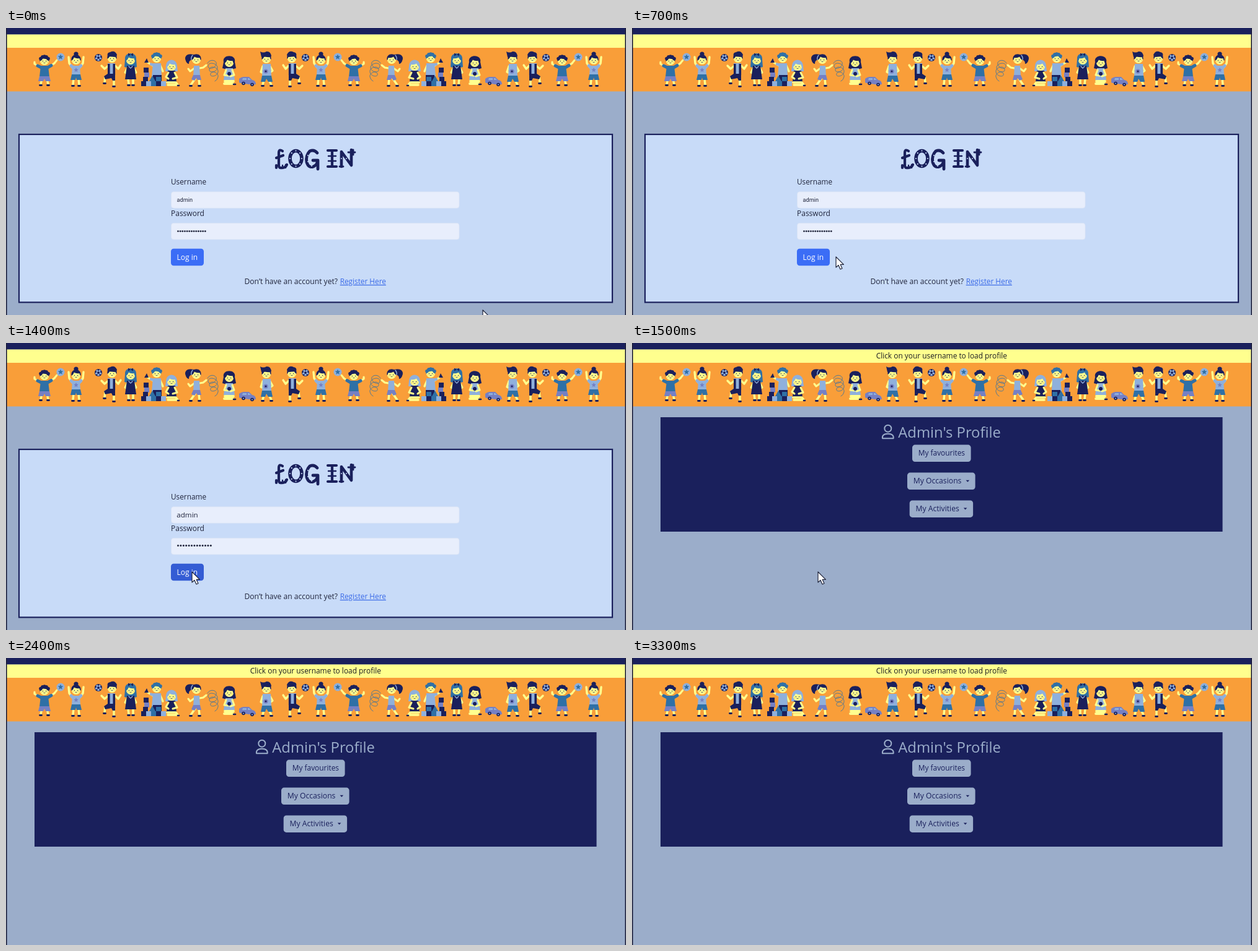
Recreate the animation shown at these times as an HTML page. Size 1000 by 464 pixels, loop 3400 ms.

```html
<!DOCTYPE html>
<html lang="en">
<head>
<meta charset="utf-8">
<title>Log in</title>
<style>
  html, body { margin: 0; width: 100%; height: 100%; overflow: hidden; background: #9badca; }
  svg { display: block; width: 100vw; height: 100vh; }
  text { font-family: "Open Sans", "Noto Sans", sans-serif; white-space: pre; }
  .auto { font-family: Roboto, "Liberation Sans", sans-serif; }
</style>
</head>
<body>
<svg id="stage" viewBox="0 0 1000 464" preserveAspectRatio="none"></svg>
<script>
const NAVY = '#1a205c', YEL = '#ffff8e', BLUE = '#2f70a6', PERI = '#7580c4',
      PALE = '#8fb0dc', SKY = '#9badca', INK = '#20253c';

const rect = (x, y, w, h, fill, r = 0, extra = '') =>
  `<rect x="${x}" y="${y}" width="${w}" height="${h}" rx="${r}" fill="${fill}" ${extra}/>`;
const disc = (x, y, r, fill, ry = r) =>
  `<ellipse cx="${x}" cy="${y}" rx="${r}" ry="${ry}" fill="${fill}"/>`;
const shape = (d, fill) => `<path d="${d}" fill="${fill}"/>`;
const line = (d, color, w) =>
  `<path d="${d}" fill="none" stroke="${color}" stroke-width="${w}" stroke-linecap="round" stroke-linejoin="round"/>`;
const label = (x, y, s, size, fill = INK, extra = '') =>
  `<text x="${x}" y="${y}" font-size="${size}" fill="${fill}" ${extra}>${s}</text>`;
const group = (id, body) => `<g id="${id}">${body}</g>`;

function star(x, y, r, fill) {
  const pts = Array.from({ length: 10 }, (_, i) => {
    const a = i * Math.PI / 5 - Math.PI / 2, d = i % 2 ? r * .45 : r;
    return (x + d * Math.cos(a)).toFixed(1) + ',' + (y + d * Math.sin(a)).toFixed(1);
  });
  return `<polygon points="${pts.join(' ')}" fill="${fill}"/>`;
}

// Head with eyes, cheeks and a smile
const face = (x, y) => disc(x, y, 7, YEL) + disc(x - 2.6, y + .5, .7, NAVY) +
  disc(x + 2.6, y + .5, .7, NAVY) + disc(x - 4.4, y + 2.5, .9, '#f2c963') + disc(x + 4.4, y + 2.5, .9, '#f2c963') +
  line(`M${x - 1.4} ${y + 3.2}q1.4 1.3 2.8 0`, NAVY, .7);
const fringe = (x, y, color) =>
  shape(`M${x - 7.4} ${y + 2}C${x - 10} ${y - 11} ${x + 10} ${y - 11} ${x + 7.4} ${y + 2}` +
    'q-1.500 -1 -2 -4q-5 1 -8.500 -1.500q-1.500 4 -4.300 5.500z', color);
const curls = (x, y, color) => [-6, -3, 0, 3, 6].map(d => disc(x + d, y - 7 + d * d / 10, 2.8, color)).join('');
const leg = (d, x, y) => line(d + `L${x} ${y}`, YEL, 3.4) + line(`M${x - 1.5} ${y + 1.500}h3`, NAVY, 2.8);
const legs = (a, b, top, foot) => leg(`M-4 ${top}`, a, foot) + leg(`M4 ${top}`, b, foot);

const ball = (x, y) => disc(x, y, 6, NAVY) + disc(x, y, 5.2, PALE) + disc(x, y, 2, NAVY) +
  [0, 1, 2, 3, 4].map(i => disc(x + 4.4 * Math.sin(i * 1.257), y - 4.4 * Math.cos(i * 1.257), 1.3, NAVY)).join('');

const figures = {
  out: () => line('M-6 64L-16 58V55M6 64L16 57', YEL, 3.2) + legs(-6, 6, 82, 91) +
    line('M-5 64L-11 61M5 64L11 60.500', BLUE, 5) + shape('M-6 61H6L8 79H-8z', BLUE) +
    shape('M-8 78H8L10 86H2L0 82L-2 86H-10z', PERI) + face(0, 53) + fringe(0, 52, NAVY) + curls(0, 53, NAVY) +
    line('M16 57L20 52', YEL, 3) + disc(26, 47, 6.5, PALE) + star(26, 47, 4.6, BLUE),
  up: () => line('M-6 64L-11 57L-12 47M6 64L11 57L12 47', YEL, 3.4) + legs(-5, 5, 82, 92) +
    line('M-5 64L-8 61M5 64L8 61', PALE, 5) + shape('M-6 61H6L7 76H-7z', PALE) + star(0, 68, 4, PERI) +
    shape('M-7 75H7L9 84H1L0 80L-1 84H-9z', BLUE) + disc(0, 42, 3.6, NAVY) + face(0, 52) + fringe(0, 51, NAVY),
  kick: () => line('M-3 61L-9 66L-14 61M8 61L13 66L17 60', YEL, 3.2) + leg('M0 77L-8 79', -9, 88) +
    leg('M6 77', 6, 93) + shape('M-4 57H8L8 77H-4z', PALE) + rect(-4, 58, 3.6, 18, NAVY) +
    rect(4.5, 58, 3.6, 18, NAVY) + shape('M-4 74H8V85H4L2 81L-8 83L-10 78z', NAVY) +
    face(3, 49) + fringe(3, 48, NAVY) + shape('M-4 46Q-6 40 0 39Q7 35 11 43L10 47z', NAVY) + ball(-19, 48),
  girl: () => shape('M-9 50C-10 38 10 38 9 50L10 63Q0 66 -10 63z', BLUE) + legs(-3, 4, 82, 91) +
    line('M-5 64L-9 72L-4 75M5 64L9 72L4 75', YEL, 3) +
    shape('M-6 61H6L9 83H-9z', NAVY) + line('M-3 62L0 65L3 62', PALE, 1.4) + face(0, 52) + fringe(0, 51, BLUE) +
    shape('M0 43l-4 -2.500v5zM0 43l4 -2.500v5z', NAVY),
  build: () => line('M-6 61L-14 56M6 61L10 70', YEL, 3.2) + shape('M-6 57H7L8 78H-8z', PALE) +
    line('M-5 60L-9 58.500', PALE, 4.500) + rect(-6, 76, 14, 11, NAVY) + face(0, 49) + fringe(0, 48, BLUE) +
    curls(0, 49, BLUE) + shape('M-20 56l4 -7l3 7z', NAVY) +
    rect(-21, 64, 8, 8, NAVY) + rect(-20, 72, 8, 8, PERI) + rect(-22, 79, 8, 7, NAVY) +
    shape('M-12 86l5 -9l5 9z', BLUE) + rect(-1, 79, 8, 7, BLUE) +
    [NAVY, PALE, BLUE, NAVY, PALE].map((c, i) => rect(-25 + i * 8, 86, 8, 8, c)).join(''),
  kneel: () => shape('M-9 62C-9 48 9 48 9 62L10 70H-10z', PALE) +
    shape('M-6 69H6L8 87H-8z', NAVY) + line('M-7 88H7L10 92H-6', YEL, 3.6) +
    line('M-5 72L-9 79L-5 82M5 72L9 80L2 82', YEL, 3) + face(0, 62) + fringe(0, 61, PALE) +
    line('M10 93h2', NAVY, 2.6),
  pony: () => shape('M0 43Q-14 40 -14 50Q-12 58 -8 58Q-9 52 0 50z', NAVY) +
    line('M1 65L-6 70L-9 66M9 65L15 64L20 60', YEL, 3) + leg('M2 82', -5, 92) + leg('M8 82', 9, 92) +
    shape('M0 61H9L10 78H-1z', PALE) + shape('M-1 76H10L12 84H6L4 81L1 85L-4 83z', PERI) +
    face(4, 51) + fringe(4, 50, NAVY) + line('M-2 44Q-5 48 -4 51', PALE, 1.4) +
    line('M22 57c4 -8 16 -5 14 2s-14 9 -13 2s15 -4 15 3s-14 10 -13 3s15 -4 14 4s-14 9 -12 3s13 -2 12 5q-1 5 -5 7', BLUE, .8),
  sit: () => shape('M-9 55C-12 42 12 42 9 55L11 65Q0 69 -11 65z', NAVY) +
    shape('M-6 65H6L9 84H-9z', PALE) + line('M-7 86H7M-8 90H6', YEL, 3.8) +
    line('M-5 68L-8 76L-2 77M5 68L8 76L2 78', YEL, 3) + disc(0, 74, 3, NAVY) +
    face(0, 56) + fringe(0, 55, NAVY) + line('M7 91h3', NAVY, 2.6),
  stand: () => line('M-6 62L-9 71L-3 74M6 62L10 69L3 74', YEL, 3.2) + legs(-6, 8, 84, 92) +
    shape('M-6 58H7L8 78H-7z', PALE) + disc(-1, 70, 3.6, PERI) + disc(-1, 70, 1.5, NAVY) +
    shape('M-7 77H8L10 87H3L0 82L-2 87H-9z', BLUE) + face(0, 50) + fringe(0, 49, NAVY) +
    shape('M-8 47L-10 38Q-5 41 0 38Q7 37 8 46z', NAVY),
  car: () => shape('M-13 88V82Q-9 79 -6 79H3L8 84Q14 85 14 91L9 92L-11 89z', PERI) +
    shape('M-7 81H-1V84H-8zM1 81H3L6 84H1z', PALE) + disc(-6, 89.5, 2.8, NAVY) + disc(8, 91.5, 2.8, NAVY) +
    disc(-6, 89.5, 1.1, PALE) + disc(8, 91.5, 1.1, PALE)
};

// Minus before a name mirrors the figure
const parade = 'out 62,up 113,kick 168,girl 201,build 243,kneel 267,pony 303,sit 360,car 389,stand 420,' +
  '-kick 464,up 508,-out 561,-pony 626,-kneel 659,-build 685,-girl 727,sit 756,car 786,stand 817,' +
  '-kick 852,out 897,up 948';
const kids = parade.split(',').map(entry => {
  const [name, x] = entry.split(' '), flip = name[0] === '-';
  return `<g transform="translate(${x} 0) scale(${flip ? -1 : 1} 1)">${figures[name.replace('-', '')]()}</g>`;
}).join('');

const dots = (n, x, y, gap, r) => Array.from({ length: n }, (_, i) => disc(x + i * gap, y, r, INK)).join('');

// Chunky hand-drawn heading
const PANEL = '#c8dbf8';
const heading = '<g role="img" aria-label="LOG IN">' +
  line('M446 199Q440 195 440 202V222Q440 227 445 226Q451 226 453 221M436 210L447 206M436 226V222', NAVY, 4.2) +
  line('M446 227v-5M451 226v-5', NAVY, 2.4) +
  `<ellipse cx="467.5" cy="211" rx="9.5" ry="12.5" fill="none" stroke="${NAVY}" stroke-width="5.6"/>` +
  Array.from({ length: 8 }, (_, i) =>
    disc(467.5 + 9.5 * Math.cos(i * .785), 211 + 12.5 * Math.sin(i * .785), 1.1, PANEL)).join('') +
  line('M502 202Q497 196 490 199Q483 206 485 217Q488 227 496 224Q502 221 503 214H495M503 214V228', NAVY, 4.8) +
  [[487, 206], [487, 216], [493, 223]].map(p => disc(...p, 1, PANEL)).join('') +
  line('M519 198H533M519 224H533M526 198V224', NAVY, 4.2) + line('M520 207H532M520 215H532', NAVY, 2.4) +
  line('M541 224V200L557 222V197', NAVY, 4.6) + line('M552 201H563M538 224H544M560 197V205', NAVY, 2.8) +
  disc(541, 211, 1, PANEL) + disc(549, 211, 1, PANEL) + '</g>';

const field = y => rect(266.5, y, 464.5, 26.5, '#e8eefc', 4, 'stroke="#d9e2f4" stroke-width=".7"');

const login = rect(21, 172, 957, 271.5, PANEL, 0, `stroke="${NAVY}" stroke-width="2.2"`) + heading +
  label(266, 253, 'Username', 11.8) + field(264.7) + label(266, 304, 'Password', 12) + field(315.4) +
  group('autofill', label(275.5, 281, 'admin', 9.2, INK, 'class="auto"') + dots(13, 277.5, 328.6, 3.65, 1.45)) +
  group('filled', label(275.3, 281.5, 'admin', 11.6) + dots(13, 277.5, 327.6, 4.4, 1.5)) +
  rect(266, 356.7, 53, 27.5, '#3b6df6', 4.5, 'id="button"') + label(275.5, 374.5, 'Log in', 12, '#fff') +
  label(384.5, 414, 'Don’t have an account yet?', 12.1) +
  label(538.7, 414, 'Register Here', 11.8, '#3b6be8', 'text-decoration="underline"');

const pill = (x, y, w, s, size, caret) => rect(x, y, w, 27.5, SKY, 4.5) +
  label(x + 9.7, y + 17.7, s, size, NAVY) +
  (caret ? shape(`M${caret} ${y + 12.2}h5.6l-2.8 2.9z`, NAVY) : '');

const profile = label(393.7, 25.3, 'Click on your username to load profile', 11.9, '#1c1c24') +
  rect(46, 120, 906.5, 185, NAVY) +
  `<g fill="none" stroke="${SKY}" stroke-width="2"><circle cx="412.8" cy="138.2" r="5.5"/>` +
  '<path d="M404 154.2Q402.8 146.8 412.8 146.8T421.6 154.2Z" stroke-linejoin="round"/></g>' +
  label(429.3, 152.5, 'Admin\'s Profile', 23.8, SKY) +
  pill(452, 164.6, 94.6, 'My favourites', 11.9) +
  pill(444, 209.6, 109.6, 'My Occasions', 12.2, 538.6) +
  pill(447.7, 254.4, 102.4, 'My Activities', 12.2, 534.8);

const stage = document.getElementById('stage');
stage.innerHTML = rect(0, 0, 1000, 464, SKY) + rect(0, 0, 1000, 10.5, NAVY) +
  rect(0, 10.5, 1000, 21.5, YEL) + rect(0, 32, 1000, 70.5, '#f99e39') + kids +
  group('login', login) + group('profile', profile) +
  rect(0, 0, 1.6, 464, '#20233f') + rect(998.4, 0, 1.6, 464, '#20233f') +
  group('cursor', `<path d="M0 0V17L4 13.5L7 20L10 18.7L7.2 12.4H12.4Z" fill="#fff" stroke="${INK}" stroke-width="1.2" stroke-linejoin="round"/>`);

// Pointer stops: time, x, y
const STEP = 100, LOOP = 3400;
const path = [[0, 769, 456], [100, 690, 436], [200, 540, 402], [300, 420, 384], [400, 362, 376],
  [500, 340, 372], [600, 330, 370], [700, 329, 370], [800, 317, 370], [900, 304, 370],
  [1000, 300, 370], [1800, 300, 370], [2100, 424, 400], [2300, 480, 466]];
const HOVER = 800, CLICK = 1300, LOADED = 1500, GONE = 2300;
const el = id => document.getElementById(id);
const show = (id, on) => el(id).style.display = on ? '' : 'none';

function pointerAt(t) {
  const i = Math.max(1, path.findIndex(p => p[0] >= t));
  const [t0, x0, y0] = path[i - 1], [t1, x1, y1] = path[i];
  const k = (t - t0) / (t1 - t0);
  return [x0 + (x1 - x0) * k, y0 + (y1 - y0) * k];
}

function draw(now) {
  const t = Math.floor((now % LOOP) / STEP) * STEP;
  show('login', t < LOADED);
  show('profile', t >= LOADED);
  show('autofill', t < CLICK);
  show('filled', t >= CLICK);
  el('button').setAttribute('fill', t >= HOVER ? '#345cd4' : '#3b6df6');
  show('cursor', t < GONE);
  if (t < GONE) el('cursor').setAttribute('transform', `translate(${pointerAt(t)})`);
}

const start = performance.now();
function tick() {
  draw(performance.now() - start);
  requestAnimationFrame(tick);
}
tick();
</script>
</body>
</html>
```
